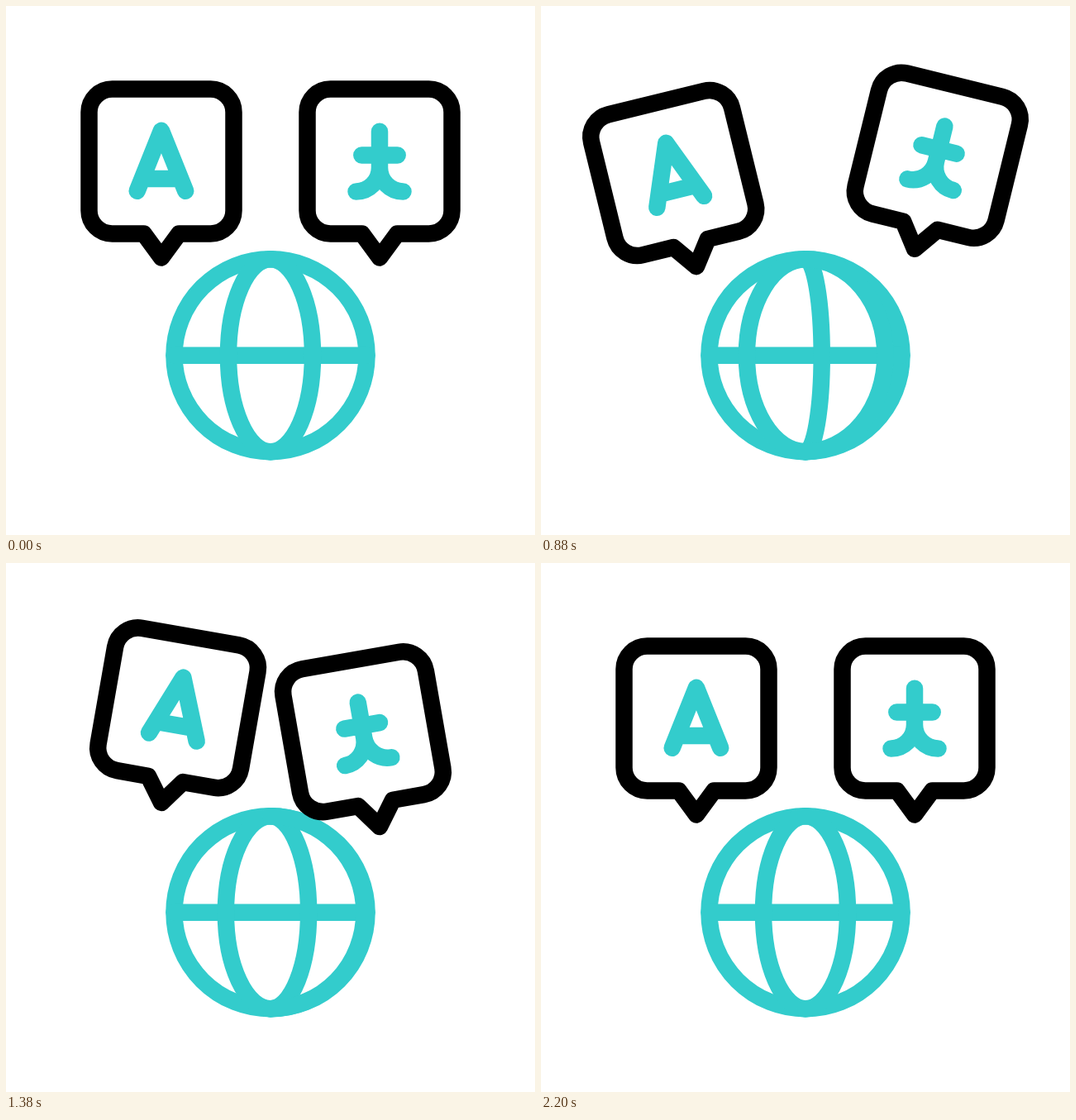
An HTML page with a canvas for the animation above (2400 ms loop, 640 by 640 pixels).

```html
<!DOCTYPE html>
<html lang="en">
<head>
<meta charset="utf-8">
<title>Translation</title>
<style>
  html, body { margin: 0; width: 100%; height: 100%; overflow: hidden; background: #fff; }
  canvas { display: block; width: 640px; height: 640px; }
</style>
</head>
<body>
<canvas id="stage" width="640" height="640"></canvas>
<script>
const ctx = document.getElementById('stage').getContext('2d');
const LOOP = 2400, STEP = 20;
const TEAL = '#33cccc', BLACK = '#000';
const LINE = 20.5;
const GLOBE = { x: 320, y: 422.75, r: 116.5, near: 51 };
const TIP = { x: 188, y: 304.5 };

// [time, value] pairs, eased between neighbours
const TILT = [[200, 0], [800, -15], [1400, 10], [1800, -4], [2200, 0]];
const LIFT = [[200, 0], [700, 26], [1200, -26], [1700, 13], [2200, 0]];
const TURN = [[612, 0], [1300, 1], [1795, 2]];

// Symmetric cubic ease with handles at a and 1 - a
function ease(x, a) {
  let lo = 0, hi = 1;
  for (let i = 0; i < 30; i++) {
    const t = (lo + hi) / 2, s = 1 - t;
    if (3 * a * t * s * s + 3 * (1 - a) * t * t * s + t * t * t < x) lo = t;
    else hi = t;
  }
  return lo * lo * (3 - 2 * lo);
}

function valueAt(keys, t, a = 1 / 3) {
  if (t <= keys[0][0]) return keys[0][1];
  for (let i = 1; i < keys.length; i++) {
    const [t0, v0] = keys[i - 1], [t1, v1] = keys[i];
    if (t < t1) return v0 + (v1 - v0) * ease((t - t0) / (t1 - t0), a);
  }
  return keys[keys.length - 1][1];
}

function stroke(color, build) {
  ctx.strokeStyle = color;
  ctx.beginPath();
  build();
  ctx.stroke();
}

function meridian(dx) {
  const { x, y, r } = GLOBE;
  stroke(TEAL, () =>
    ctx.ellipse(x, y, Math.abs(dx), r, 0, -Math.PI / 2, Math.PI / 2, dx < 0));
}

function drawGlobe(turn) {
  const { x, y, r, near } = GLOBE;
  const p = turn % 1;
  stroke(TEAL, () => ctx.arc(x, y, r, 0, Math.PI * 2));
  stroke(TEAL, () => { ctx.moveTo(x - r, y); ctx.lineTo(x + r, y); });
  meridian(-near - (r - near) * p);
  meridian(near - 2 * near * p);
  if (p > 0) meridian(r - (r - near) * p);
}

function bubble() {
  const l = 100.5, r = 275.5, c = 28;
  stroke(BLACK, () => {
    ctx.moveTo(TIP.x, TIP.y);
    ctx.lineTo(TIP.x - 21.3, r);
    ctx.arcTo(l, r, l, l, c);
    ctx.arcTo(l, l, r, l, c);
    ctx.arcTo(r, l, r, r, c);
    ctx.arcTo(r, r, l, r, c);
    ctx.lineTo(TIP.x + 21.3, r);
    ctx.closePath();
  });
}

function letterA() {
  stroke(TEAL, () => {
    ctx.moveTo(158.7, 223.8);
    ctx.lineTo(187.9, 150.8);
    ctx.lineTo(217.2, 223.8);
    ctx.moveTo(165, 209);
    ctx.lineTo(211, 209);
  });
}

function glyph() {
  const x = TIP.x;
  stroke(TEAL, () => {
    ctx.moveTo(x, 151.8);
    ctx.lineTo(x, 195.5);
    ctx.ellipse(x - 28.5, 195.5, 28.5, 29, 0, 0, Math.PI / 2);
    ctx.moveTo(x, 195.5);
    ctx.ellipse(x + 28.5, 195.5, 28.5, 29, 0, Math.PI, Math.PI / 2, true);
    ctx.moveTo(x - 21.7, 180.5);
    ctx.lineTo(x + 21.7, 180.5);
  });
}

function drawBubble(offset, dy, degrees, sign) {
  ctx.save();
  ctx.translate(TIP.x + offset, TIP.y + dy);
  ctx.rotate(degrees * Math.PI / 180);
  ctx.translate(-TIP.x, -TIP.y);
  bubble();
  sign();
  ctx.restore();
}

function draw(t) {
  ctx.fillStyle = '#fff';
  ctx.fillRect(0, 0, 640, 640);
  ctx.lineWidth = LINE;
  ctx.lineCap = ctx.lineJoin = 'round';
  const tilt = valueAt(TILT, t), lift = valueAt(LIFT, t);
  drawGlobe(valueAt(TURN, t, 0.45));
  drawBubble(0, lift, tilt, letterA);
  drawBubble(264, -lift, -tilt, glyph);
}

const start = performance.now();
function tick() {
  const t = (performance.now() - start) % LOOP;
  draw(Math.floor(t / STEP) * STEP);
  requestAnimationFrame(tick);
}
tick();
</script>
</body>
</html>
```
